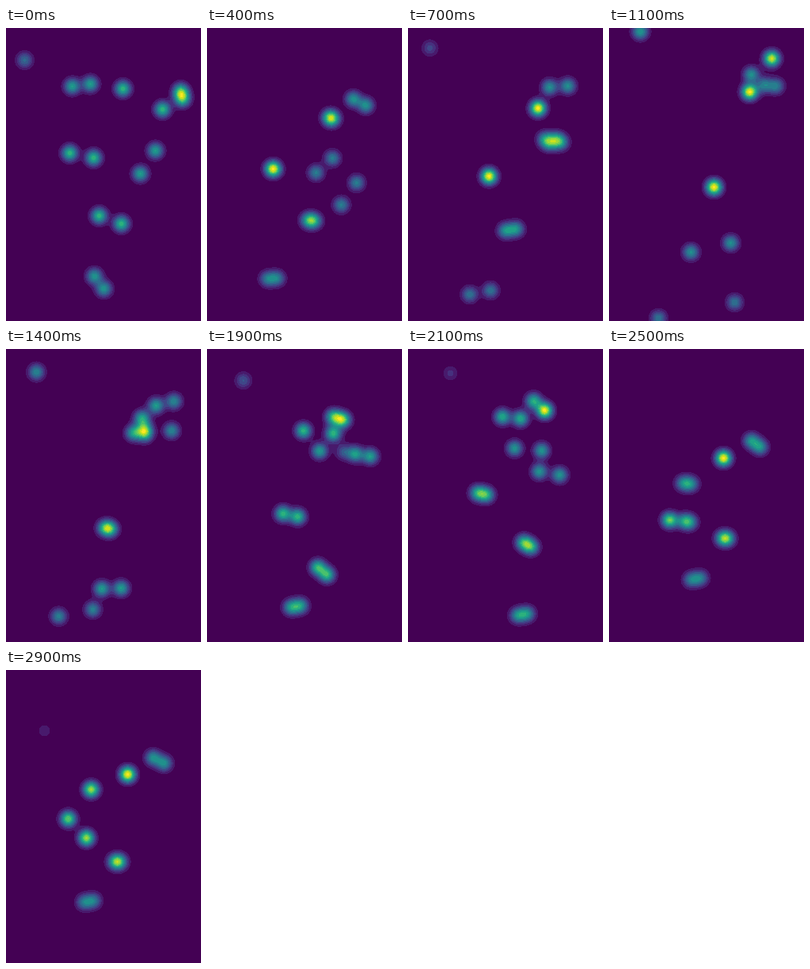
Animation, 246 px wide and 369 px high, one loop 3 s. Source, as a matplotlib script:

```python
import numpy as np
import matplotlib.pyplot as plt
from matplotlib.animation import FuncAnimation

W, H, DPI = 246, 369, 100
FRAMES, STEP_MS = 30, 100
SIGMA = 6.9
BANDS = 15
KEYS = np.array([0, 4, 11, 17, 21, 25, 29])
t = np.arange(FRAMES)


def path(*points):
    """Smooth curve through x + yj key points, one value per frame."""
    pts = np.array(points, complex)
    i = np.clip(np.searchsorted(KEYS, t, "right") - 1, 0, len(KEYS) - 2)
    span = KEYS[i + 1] - KEYS[i]
    u = (t - KEYS[i]) / span
    slope = 0.8 * np.gradient(pts, KEYS)
    return ((2 * u**3 - 3 * u**2 + 1) * pts[i]
            + (u**3 - 2 * u**2 + u) * span * slope[i]
            + (3 * u**2 - 2 * u**3) * pts[i + 1]
            + (u**3 - u**2) * span * slope[i + 1])


def pulse(center, width):
    return np.exp(-((t - center) / width) ** 2)


blobs = []


def add(position, strength=1.0):
    blobs.append((position, strength * np.ones(FRAMES)))


def add_pair(center, spread, right=1.0, left=None):
    add(center + spread, right)
    add(center - spread, right if left is None else left)


# Phases of the jump that push left and right joints apart
opening, arms_open = pulse(0, 2.5), pulse(0, 4)
leap = pulse(11, 3)
turn, swing = pulse(18, 4), pulse(17.5, 6)

add(path(220+79j, 200+97j, 205+38j, 173+102j, 172+77j, 190+123j, 199+117j),
    1 + 0.6 * pulse(21, 2))
add(path(222+89j, 184+89j, 179+58j, 163+108j, 158+65j, 179+115j, 185+110j))

shoulders = path(172+89j, 156+113j, 177+80j, 153+126j, 130+86j, 144+137j, 153+131j)
add_pair(shoulders, (25+13j) * opening + (20+2j) * turn)

elbows = path(147+112j, 173+179j, 203+72j, 174+135j, 151+126j, 98+169j, 107+150j)
add_pair(elbows, (41+42j) * arms_open + (24+2j) * swing, 0.85)

# The left wrist drops out while it is hidden in mid jump
visible = np.clip((abs(t - 14) - 3) / 4, 0, 1)
wrists = path(126+128j, 153+202j, 199+37j, 192+109j, 178+156j, 98+217j, 101+211j)
add_pair(wrists, (43+55j) * arms_open + (18+3j) * swing, 0.85, 0.85 * visible)

hips = path(95+160j, 83+177j, 132+200j, 116+238j, 93+182j, 76+215j, 78+187j)
add_pair(hips, (15+3j) * opening + (10+2j) * turn, 1 - 0.3 * pulse(27, 4))

knees = path(131+241j, 131+242j, 128+276j, 139+311j, 150+246j, 146+238j, 140+241j)
add_pair(knees, 3 + (11+5j) * opening + (22-6j) * leap + (3+5j) * turn)

ankles = path(117+320j, 82+315j, 110+355j, 76+311j, 144+334j, 109+289j, 104+291j)
add_pair(ankles, 6-1j + 9j * opening + (42-9j) * leap, 0.8)

# Faint stray response near the top left
add(path(23+40j, 20+42j, 39+4j, 38+51j, 53+30j, 58+78j, 48+76j),
    np.interp(t, [0, 4, 11, 21, 25, 29], [0.55, 0, 1.1, 0.26, 0.12, 0.23]))

positions, strengths = (np.array(part) for part in zip(*blobs))
cols, rows = np.arange(W), np.arange(H)


def bell(axis, center):
    return np.exp(-(axis - center[:, None]) ** 2 / (2 * SIGMA**2))


def heatmap(frame):
    pos, strength = positions[:, frame], strengths[:, frame]
    heat = (bell(rows, pos.imag) * strength[:, None]).T @ bell(cols, pos.real)
    return np.floor(heat / heat.max() * (BANDS - 0.5)) / (BANDS - 1)


fig = plt.figure(figsize=(W / DPI, H / DPI), dpi=DPI)
ax = fig.add_axes([0, 0, 1, 1])
ax.axis("off")
image = ax.imshow(heatmap(0), cmap="viridis", vmin=0, vmax=1,
                  interpolation="nearest", aspect="auto")


def update(frame):
    image.set_data(heatmap(frame))
    return [image]


anim = FuncAnimation(fig, update, frames=FRAMES, interval=STEP_MS,
                     repeat=True, repeat_delay=0)
plt.show()
```
